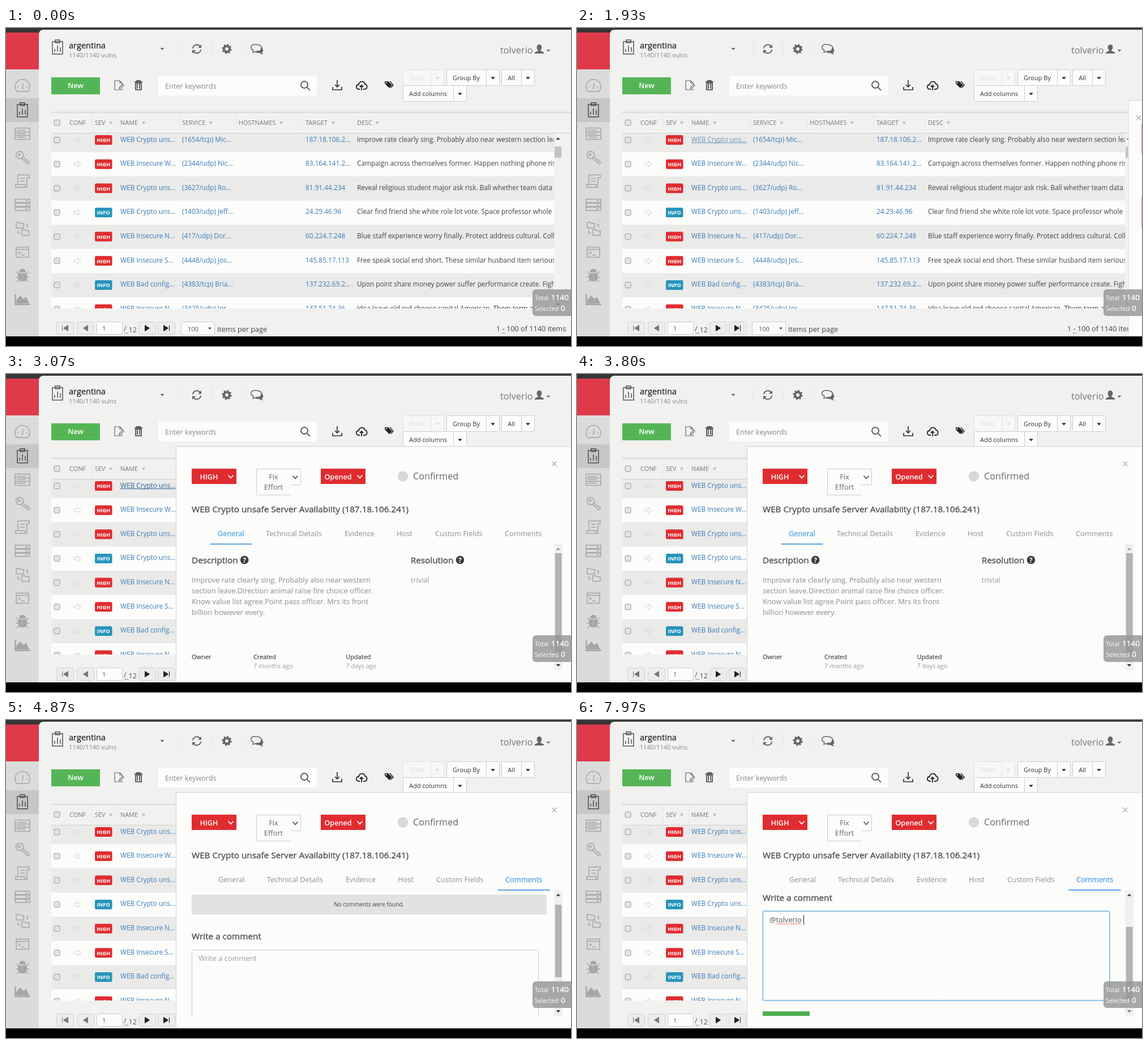
Recreate the animation shown at these times as an HTML page with a canvas. Size 998 by 561 pixels, loop 8 s.

```html
<!DOCTYPE html>
<html lang="en">
<head>
<meta charset="utf-8">
<title>Vulnerability comments</title>
<style>
html, body { margin: 0; width: 100%; height: 100%; overflow: hidden; background: #000; }
canvas { display: block; }
</style>
</head>
<body>
<canvas id="stage" width="998" height="561"></canvas>
<script>
const ctx = document.getElementById('stage').getContext('2d');
const LOOP = 8000;
const USER = 'tolverio';
const RED = '#df2c30', GREEN = '#55b556', LINK = '#3b7cb8', PAPER = '#fcfcfa';

// Event times in ms
const HOVER_ON = 1500, OPEN = 1915, OPEN_TIME = 306, HOVER_OFF = 3250;
const COMMENTS = 3900, SCROLL = 4850, FOCUS = 5760, TYPE = 6350, TYPE_STEP = 150;

const clamp = v => Math.max(0, Math.min(1, v));

// CSS "ease": cubic-bezier(.25, .1, .25, 1)
function ease(x) {
  if (x <= 0 || x >= 1) return clamp(x);
  const curve = (a, b, s) => 3 * a * s * (1 - s) ** 2 + 3 * b * s * s * (1 - s) + s ** 3;
  let lo = 0, hi = 1;
  for (let i = 0; i < 20; i++) {
    const mid = (lo + hi) / 2;
    if (curve(.25, .25, mid) < x) lo = mid; else hi = mid;
  }
  return curve(.1, 1, lo);
}

function box(x, y, w, h, fill, stroke, r = 0, lw = 1) {
  ctx.beginPath();
  ctx.roundRect(x, y, w, h, r);
  if (fill) { ctx.fillStyle = fill; ctx.fill(); }
  if (stroke) { ctx.strokeStyle = stroke; ctx.lineWidth = lw; ctx.stroke(); }
}

function font(size, weight = 400) {
  ctx.font = `${weight} ${size}px "Open Sans", sans-serif`;
}

function text(s, x, y, size, color, { weight = 400, align = 'left', heavy = 0 } = {}) {
  font(size, weight);
  ctx.textAlign = align;
  ctx.fillStyle = color;
  ctx.fillText(s, x, y);
  if (heavy) {
    ctx.strokeStyle = color;
    ctx.lineWidth = heavy;
    ctx.strokeText(s, x, y);
  }
}

function width(s, size) {
  font(size);
  return ctx.measureText(s).width;
}

function icon(x, y, d, { stroke, fill, lw = 1.5 }) {
  const path = new Path2D(d);
  ctx.save();
  ctx.translate(x, y);
  ctx.lineWidth = lw;
  if (fill) { ctx.fillStyle = fill; ctx.fill(path); }
  if (stroke) { ctx.strokeStyle = stroke; ctx.stroke(path); }
  ctx.restore();
}

function dot(x, y, r, fill) {
  ctx.beginPath();
  ctx.arc(x, y, r, 0, 7);
  ctx.fillStyle = fill;
  ctx.fill();
}

function clipped(x, y, w, h, draw) {
  ctx.save();
  ctx.beginPath();
  ctx.rect(x, y, w, h);
  ctx.clip();
  draw();
  ctx.restore();
}

const caret = (x, y, color = '#333', s = 4) =>
  icon(x, y, `M${-s} ${-s / 2}H${s}L0 ${s / 2}Z`, { fill: color });
const upCaret = (x, y, color) => icon(x, y, 'M-4 2H4L0-2Z', { fill: color });
const cross = (x, y, s, color, lw = 1.2) =>
  icon(x, y, `M${-s} ${-s}L${s} ${s}M${-s} ${s}L${s} ${-s}`, { stroke: color, lw });
const chevron = (x, y, color) => icon(x, y, 'M-4.5-2.5L0 2.5L4.5-2.5', { stroke: color, lw: 1.8 });

const CLIPBOARD = 'M-9-10H9V12H-9ZM-4-13H4V-8H-4ZM-5 8V3M0 8V-3M5 8V0';
const SIDE_ICONS = [
  'M-10 9A13 13 0 1 1 10 9ZM0 5L1-6M-9 1H-7M7 1H9',
  CLIPBOARD,
  'M-13-10H13V-3H-13ZM-13-3H13V3H-13ZM-13 3H13V10H-13ZM-10-6H6M-10 0H6M-10 6H6',
  'M-5-11A6.5 6.5 0 1 0-4.9-11ZM-6-7A2 2 0 1 0-5.9-7ZM-2 1L9 11H12V7L9 7V4H6L1-2',
  'M-8-11H12V-6H8V11H-12V6H-8ZM-12 11H5V6H-12M-4-5H4M-4 0H4',
  'M-13-10H13V-4H-13ZM-13-3H13V3H-13ZM-13 4H13V10H-13ZM5-7H10M5 0H10M5 7H10',
  'M-11-11H-6L-4-9H2V-1H-11ZM-1 2H4L6 4H12V12H-1ZM6-7H9V-1M-8 3V8H-4',
  'M-11-9H11V9H-11ZM-11-5H11M-7-1L-4 1L-7 3M-2 5H4',
  'M-5-7A5 5 0 0 1 5-7ZM-7-4H-1V9A7 8 0 0 1-7 4ZM1-4H7V4A7 8 0 0 1 1 9ZM-7-3L-11-8M7-3L11-8M-7 2H-12M7 2H12M-6 6L-10 11M6 6L10 11',
  'M-13-9H-12V8H13V9H-13ZM-10 6V1L-4-6L2 0L6-4L11 6Z'
];

function sidebar() {
  box(0, 8, 58, 536, '#dbdbda');
  box(0, 8, 58, 65, '#e0394a');
  box(0, 124, 58, 42, '#c7c7c6');
  SIDE_ICONS.forEach((d, i) => icon(29, 103 + i * 41.8, d, {
    stroke: i === 1 ? '#4c4c4c' : '#a5a5a5',
    fill: i > 7 ? '#a5a5a5' : null
  }));
}

function dottedLine(x, y1, y2) {
  ctx.setLineDash([2, 2]);
  icon(x, 0, `M0 ${y1}V${y2}`, { stroke: '#dedede', lw: 1 });
  ctx.setLineDash([]);
}

function gear(x, y) {
  ctx.strokeStyle = '#666';
  for (const [r, w, dash] of [[5, 4, []], [7.2, 3, [2.83, 2.83]]]) {
    ctx.beginPath();
    ctx.arc(x, y, r, 0, Math.PI * 2);
    ctx.lineWidth = w;
    ctx.setLineDash(dash);
    ctx.stroke();
  }
  ctx.setLineDash([]);
}

function topBar() {
  icon(91, 34, CLIPBOARD, { stroke: '#555' });
  text('argentina', 111, 36, 14.6, '#222', { heavy: .25 });
  text('1140/1140 vulns', 111, 52, 11, '#888');
  caret(276, 37, '#555', 3.5);
  [311, 364, 417].forEach(x => dottedLine(x, 20, 56));
  icon(337, 37, 'M-7-1A7 7 0 0 1 6-4M7 1A7 7 0 0 1-6 4', { stroke: '#666', lw: 2 });
  icon(337, 37, 'M8-8V-2H2ZM-8 8V2H-2Z', { fill: '#666' });
  gear(390, 37);
  icon(443, 37, 'M-3-8C13-8 13 5 0 4L-7 6L-6 2C-13-1-11-8-3-8Z', { stroke: '#666' });
  icon(443, 37, 'M7-3C13 0 12 5 9 6L11 10L4 7C1 7-1 7-3 5C5 5 8 1 7-3Z', { fill: '#666' });
  text(USER, 873, 44.5, 16.3, '#777');
  icon(942, 37, 'M0-8C6-8 5 1 2 2V3L8 6V8H-8V6L-2 3V2C-5 1-6-8 0-8Z', { fill: '#666' });
  caret(958, 40, '#666', 3.5);
}

function splitButton(label, x, y, w, split, off) {
  box(x + .5, y + .5, w, 28, off ? '#f7f7f6' : PAPER, off ? '#e2e2e2' : '#ccc', 1);
  icon(x + split + .5, y, 'M0 0V28', { stroke: off ? '#e2e2e2' : '#ccc', lw: 1 });
  text(label, x + split / 2, y + 18.5, 11, off ? '#dcdcdc' : '#333', { align: 'center' });
  caret(x + (split + w) / 2 + .5, y + 15.5, off ? '#ddd' : '#222', 3.8);
}

function toolbar() {
  box(80, 87, 86, 30, GREEN);
  text('New', 123, 106, 12.8, '#fff', { weight: 600, align: 'center' });
  icon(200, 101, 'M5 6V8H-8V-8H1L5-4V-2M1-8V-4H5M0 6L1 3L6-2L8 0L3 5Z', { stroke: '#666', lw: 1.2 });
  icon(234, 101, 'M-7-6H7M-3-6V-8H3V-6M-5-4V8H5V-4ZM-2-3V6M2-3V6', { stroke: '#333', lw: 1.5 });
  box(269, 84, 280, 35, PAPER);
  text('Enter keywords', 281, 106.5, 12.65, '#888');
  icon(529, 102, 'M-2-8A6 6 0 1 0-1.9-8ZM3 3L8 8', { stroke: '#666', lw: 2 });
  icon(585, 101, 'M0-9V3M-4-1L0 3L4-1M-8 3V8H8V3', { stroke: '#333', lw: 1.7 });
  icon(628, 102, 'M-3 6H-5C-11 5-10-2-5-2C-4-9 5-9 6-3C11-3 11 6 5 6H3M0 8V-1M-3 2L0-1L3 2', { stroke: '#222', lw: 1.8 });
  icon(676, 100, 'M-7-6H-1L6 1L1 6L-7-2ZM1-6H3L9 1L4 6L3 5L7 1Z', { fill: '#222' });
  dot(671.5, 96.5, 1.2, '#eee');
  splitButton('Tools', 701, 73, 72, 49, true);
  splitButton('Group By', 778, 73, 93, 70);
  splitButton('All', 875, 73, 58, 35);
  splitButton('Add columns', 701, 101, 112, 89);
}

const HEADS = [['CONF', 112], ['SEV', 157, 185], ['NAME', 202, 243], ['SERVICE', 311, 361.5],
  ['HOSTNAMES', 411, 486], ['TARGET', 529, 578], ['DESC', 620, 656]];

const ROWS = [
  ['HIGH', 'WEB Crypto uns...', '(1654/tcp) Mic...', '187.18.106.2...', 'Improve rate clearly sing. Probably also near western section leave.'],
  ['HIGH', 'WEB Insecure W...', '(2344/udp) Nic...', '83.164.141.2...', 'Campaign across themselves former. Happen nothing phone rise'],
  ['HIGH', 'WEB Crypto uns...', '(3627/udp) Ro...', '81.91.44.234', 'Reveal religious student major ask risk. Ball whether team data'],
  ['INFO', 'WEB Crypto uns...', '(1403/udp) Jeff...', '24.29.46.96', 'Clear find friend she white role lot vote. Space professor whole'],
  ['HIGH', 'WEB Insecure N...', '(417/udp) Dor...', '60.224.7.248', 'Blue staff experience worry finally. Protect address cultural. College'],
  ['HIGH', 'WEB Insecure S...', '(4448/udp) Jos...', '145.85.17.113', 'Free speak social end short. These similar husband item serious'],
  ['INFO', 'WEB Bad config...', '(4383/tcp) Bria...', '137.232.69.2...', 'Upon point share money power suffer performance create. Fight'],
  ['HIGH', 'WEB Insecure N...', '(3425/udp) Jor...', '147.51.74.36', 'Idea leave old red choose capital American. Them term agree']
];

const checkbox = y => box(85, y - 5, 10, 10, '#e4e4e4', '#999', 2);

function row(cells, i, t) {
  const y = 196.5 + i * 42.65, base = y + 4;
  const [sev, name, service, target, desc] = cells;
  box(80, y - 20, 888, 42.65, i % 2 ? PAPER : '#eaeae9');
  checkbox(y + 1);
  icon(126, y + 1, 'M-6-2H0V-5L6 0L0 5V2H-6Z', { stroke: '#dcdcdc', lw: 1.2 });
  box(157, y - 7.5, 30.5, 17, sev === 'HIGH' ? RED : '#2795bb', null, 2.5);
  text(sev, 172.2, y + 4.8, 9.3, '#fff', { weight: 700, align: 'center' });
  const hover = i === 0 && t >= HOVER_ON && t < HOVER_OFF;
  const color = !hover ? LINK : t < 2300 ? '#6d93b4' : '#2c6594';
  text(name, 202, base, 11.8, color);
  if (hover) box(202, base + 1.5, width(name, 11.8), 1, color);
  text(service, 311, base, 11.8, LINK);
  text(target, 529, base, 11.8, LINK);
  text(desc, 620, base, 11.8, '#444');
}

function table(t) {
  box(80, 147, 918, 1, '#dcdfe8');
  box(80, 149, 918, 1, '#c6cbdd');
  checkbox(167);
  for (const [label, x, close] of HEADS) {
    text(label, x, 170.5, 10.9, '#777');
    if (close) cross(close, 167, 2.2, '#aaa');
  }
  [152, 198, 306, 407, 523, 615].forEach(x => dottedLine(x + .5, 150, 185));
  box(80, 185, 918, 1, '#d0d0d0');
  clipped(80, 186, 888, 309, () => ROWS.forEach((r, i) => row(r, i, t)));
  box(968, 186, 14, 309, '#f2f2f1');
  upCaret(975, 195, '#444');
  box(969, 209, 12, 20, '#c2c2c2');
  caret(975, 488, '#444');
}

const PAGER = [
  [89, 'M-5-5V5M5-5V5L-3 0Z', '#777'], [125, 'M4-5V5L-4 0Z', '#777'],
  [234, 'M-4-5V5L4 0Z', '#222'], [268, 'M5-5V5M-5-5V5L3 0Z', '#222']
];

function pager() {
  for (const [x, d, color] of PAGER) {
    box(x + .5, 518.5, 30, 22, '#ececeb', '#d2d2d2', 3);
    icon(x + 15.5, 529.5, d, { fill: color, stroke: color, lw: 1 });
  }
  box(160.5, 518.5, 45, 22, PAPER, '#ccc', 3);
  text('1', 170, 534, 11, '#555');
  text('/', 208, 535, 12.7, '#555');
  text('12', 216.5, 536.5, 12.7, '#555');
  box(209, 538, 7, 1, '#888');
  box(309.5, 518.5, 59, 23, PAPER, '#ccc', 2);
  text('100', 321, 535, 11, '#555');
  caret(360, 530, '#333', 3.2);
  text('items per page', 373, 535.5, 12.7, '#444');
  text('1 - 100 of 1140 items', 866, 535, 12.7, '#444');
  box(876, 538, 6, 1, '#888');
}

function redSelect(label, x, w) {
  box(x, 167, w, 27, RED);
  clipped(x, 167, w - 20, 27, () => {
    font(12.6, 600);
    const tw = ctx.measureText(label).width;
    text(label, x + Math.max(4, (w - 18 - tw) / 2), 185.5, 12.6, '#fff', { weight: 600 });
  });
  chevron(x + w - 10, 181, '#fff');
}

function effortSelect(x, w) {
  const inner = w - 19;
  icon(x + .5, 167.5, `M${inner} 46H0V0H${w - 1}V28H${inner}`, { stroke: '#ccc', lw: 1 });
  const opt = { align: 'center' };
  text('Fix', x + inner / 2 + .5, 186, 12.8, '#666', opt);
  text('Effort', x + inner / 2 + .5, 204, 12.8, '#666', opt);
  chevron(x + w - 10, 182, '#555');
}

const TABS = ['General', 'Technical Details', 'Evidence', 'Host', 'Custom Fields', 'Comments'];
const TAB_X = [46, 131, 270, 362, 430, 553];

// Draws the tabs and returns how far the wrapped rows push the content down.
function tabs(left, active) {
  let line = 0, shift = 0;
  TABS.forEach((label, i) => {
    const w = width(label, 12.8), on = i === active;
    let x = left + TAB_X[i] - shift + (active === 5 ? (i % 5 ? 2 : 1) : 0);
    if (i > 1 && x + w > 962) {
      line++;
      shift += x - left - TAB_X[1];
      x = left + TAB_X[1];
    }
    const y = 285.5 + line * 37;
    text(label, x, y, 12.8, on ? '#57a5e6' : '#8e8e8e', { heavy: on ? .35 : 0 });
    if (on) box(x - 13.5, y + 13.5, w + 27, 2, '#57a5e6');
  });
  return line * 37;
}

function wrap(s, x, y, max, size, color) {
  let line = '';
  for (const word of s.split(' ')) {
    const next = line ? line + ' ' + word : word;
    if (line && width(next, size) > max) {
      text(line, x, y, size, color, { heavy: .15 });
      y += 19;
      line = word;
    } else line = next;
  }
  text(line, x, y, size, color, { heavy: .15 });
}

const heading = (s, x, y) => text(s, x, y, 15.3, '#505050', { heavy: .4 });

function helpHeading(s, x, y) {
  heading(s, x, y);
  const cx = x + width(s, 15.3) + 11.5;
  dot(cx, y - 6, 7.3, '#3c3c3c');
  text('?', cx, y - 1.5, 12, '#fff', { weight: 700, align: 'center' });
}

function generalTab(left, w, dy) {
  const half = (w - 35) * 7 / 12, rest = w - 44;
  helpHeading('Description', left, 334 + dy);
  wrap('Improve rate clearly sing. Probably also near western section leave.Direction animal raise fire ' +
    'choice officer. Know value list agree.Point pass officer. Mrs its front billion however every.',
    left, 367.5 + dy, half - 38, 12.84, '#999');
  helpHeading('Resolution', left + half, 334 + dy);
  text('trivial', left + half, 367.5 + dy, 12.84, '#999');
  const facts = [['Owner', '', 0], ['Created', '7 months ago', rest / 6], ['Updated', '7 days ago', rest * 5 / 12]];
  for (const [label, value, x] of facts) {
    text(label, left + x, 503 + dy, 10.9, '#444', { heavy: .2 });
    text(value, left + x, 519 + dy, 10.9, '#999');
  }
}

function squiggle(x, y, w) {
  let d = `M${x} ${y}`;
  for (let i = 2; i <= w; i += 2) d += `L${x + i} ${y + (i % 4 ? -2 : 0)}`;
  icon(0, 0, d, { stroke: '#e04848', lw: .9 });
}

function commentsTab(left, t, scroll) {
  const full = '@' + USER + ' ';
  const count = t < TYPE ? 0 : Math.min(full.length, 1 + Math.floor((t - TYPE) / TYPE_STEP));
  const typed = full.slice(0, count);
  const focus = clamp((t - FOCUS) / 150);

  box(left, 325 - scroll, 627, 35, '#e2e2e1');
  text('No comments were found.', left + 313, 345.5 - scroll, 10, '#444', { align: 'center' });
  heading('Write a comment', left, 403.5 - scroll);

  const y = 422 - scroll;
  ctx.globalAlpha = focus * .3;
  if (focus) box(left + .5, y + .5, 612, 157, null, '#66afe9', 3, 4);
  ctx.globalAlpha = 1;
  box(left + .5, y + .5, 612, 157, PAPER, '#c8c8c8', 3);
  ctx.globalAlpha = focus;
  if (focus) box(left + .5, y + .5, 612, 157, null, '#62a5dc', 3);
  ctx.globalAlpha = 1;
  icon(left + 609, y + 154, 'M0-6L-6 0M0-2L-2 0', { stroke: '#aaa', lw: 1 });

  const x = left + 12, base = y + 19.5;
  if (count) text(typed, x, base, 12.8, '#555');
  else text('Write a comment', x, base, 12.8, '#9a9a9a');
  if (count === full.length) squiggle(x + width('@', 12.8), base + 4, width(USER, 12.8));

  const since = t - (count ? TYPE + (count - 1) * TYPE_STEP : FOCUS);
  if (focus && Math.floor(since / 530) % 2 === 0) box(x + width(typed, 12.8), y + 7, 1, 17, '#222');
  box(left, 599 - scroll, 83, 30, count ? '#4fae51' : '#8dca8e');
}

function panel(t) {
  const w = 698 * ease((t - OPEN) / OPEN_TIME);
  if (w < 1) return;
  const x = 998 - w, left = x + 28;
  clipped(x, 127, w, 417, () => {
    box(x, 127, w, 417, PAPER);
    box(x, 127, w, 1.5, '#dcdcda');
    box(x, 127, 1, 417, '#d4d4d2');
    cross(Math.max(968.5, x + 18.5), 158.5, 4, '#aaa', 1.3);
    if (w < 100) {
      box(x + 24, 168, w, 54, RED);
      box(x + 24, 297, w, 56, RED);
      return;
    }
    const col = (w - 14) / 6, sel = Math.max(30, col - 35);
    redSelect('HIGH', left, sel);
    effortSelect(left + col, sel);
    redSelect('Opened', left + col * 2, sel);
    dot(left + col * 3 + 31, 180.5, 9.3, '#d8d8d7');
    text('Confirmed', left + col * 3 + 49, 186, 16.2, '#666');
    text('WEB Crypto unsafe Server Availabiity (187.18.106.241)', left, 244, 15.28, '#505050', { heavy: .35 });

    const commenting = t >= COMMENTS;
    const dy = tabs(left, commenting ? 5 : 0);
    const moved = clamp((t - SCROLL) / 200);
    const scroll = 85 * (1 - (1 - moved) ** 2);
    clipped(x + 1, 301 + dy, w, 221, () => {
      if (commenting) commentsTab(left, t, scroll);
      else generalTab(left, w, dy);
    });
    box(968, 300 + dy, 15, 222, '#f0f0ef');
    upCaret(975.5, 308.5 + dy, scroll ? '#444' : '#999');
    box(970, 316 + dy + scroll * 49 / 85, 11.5, commenting ? 128 : 180, '#b2b2b2');
    caret(975.5, 514 + dy, scroll >= 85 ? '#777' : '#333');
  });
}

function totals() {
  box(930, 461, 76, 47, 'rgba(150,150,150,.82)', null, 6);
  text('Total', 934, 479.5, 10.8, '#fff');
  text('1140', 963, 480, 13.5, '#fff', { heavy: .35 });
  text('Selected', 934, 499, 10.7, '#fff');
  text('0', 980, 499, 13.5, '#fff', { heavy: .35 });
}

function draw(t) {
  box(0, 0, 998, 561, '#353535');
  sidebar();
  box(58, 3, 940, 541, '#f1f1f0', null, [8, 0, 0, 0]);
  topBar();
  toolbar();
  table(t);
  pager();
  panel(t);
  totals();
  box(0, 544, 998, 17, '#000');
}

const start = performance.now();
function tick() {
  draw((performance.now() - start) % LOOP);
  requestAnimationFrame(tick);
}
tick();
</script>
</body>
</html>
```
